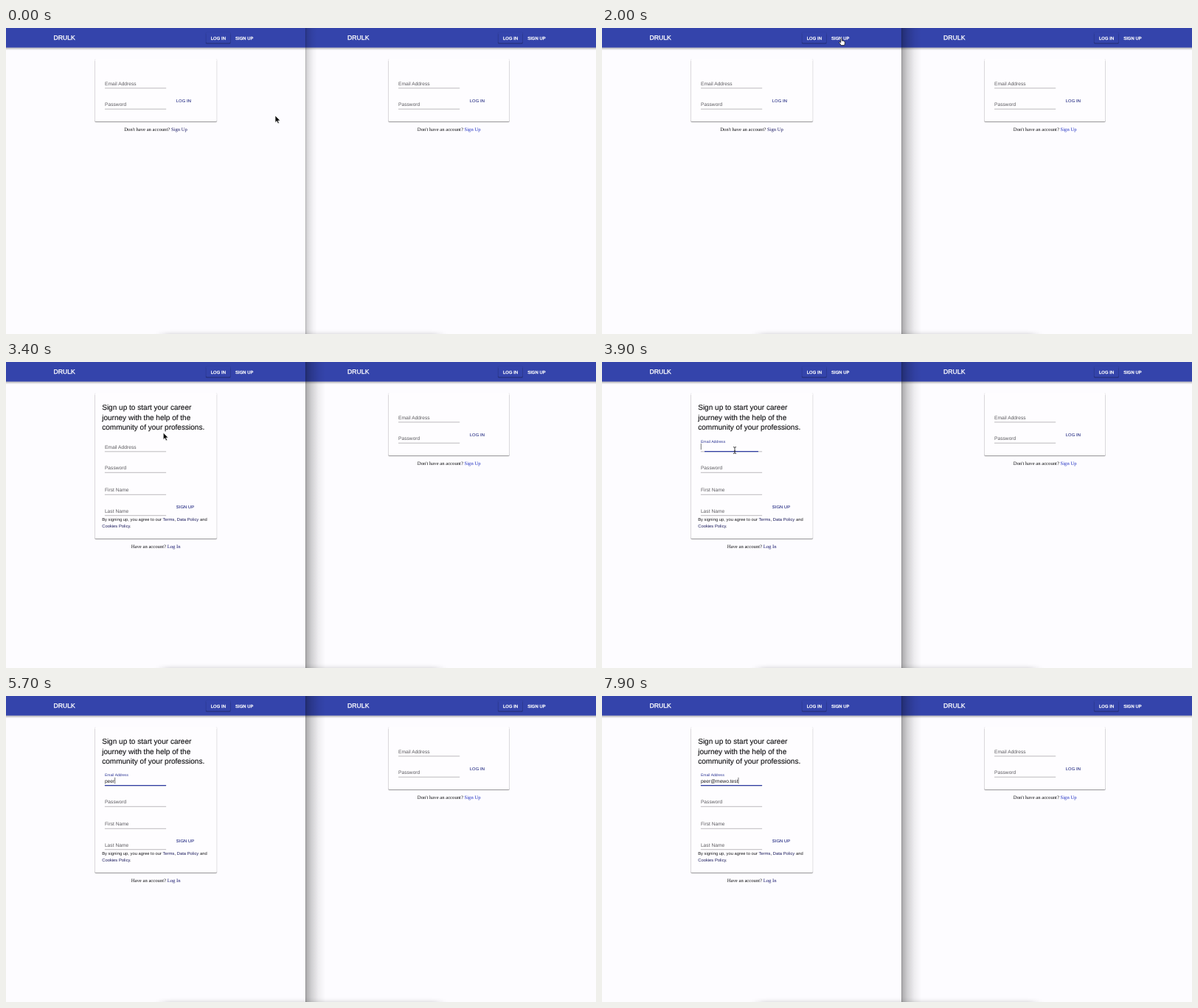
Recreate the animation shown at these times as an HTML page. Size 800 by 416 pixels, loop 8000 ms.

```html
<!DOCTYPE html>
<html lang="en">
<head>
<meta charset="utf-8">
<title>Sign up</title>
<style>
  html, body { margin: 0; width: 100%; height: 100%; overflow: hidden; background: #fdfcff; }
  svg { display: block; width: 100vw; height: 100vh; }
  text { font-family: "Liberation Sans", Arial, sans-serif; text-rendering: geometricPrecision; white-space: pre; }
  .brand { font-size: 8.6px; fill: #fff; stroke: #fff; stroke-width: .34px; letter-spacing: .06px; }
  .nav { font-size: 5.8px; fill: #fff; stroke: #fff; stroke-width: .32px; letter-spacing: .1px; }
  .button { font-size: 5.8px; fill: #2b3287; stroke: #2b3287; stroke-width: .12px; letter-spacing: .08px; }
  .label { font-size: 6.65px; fill: #5c5b5f; letter-spacing: .02px; }
  .typed { font-size: 6.7px; fill: #1c1c1e; }
  .title { font-size: 10.05px; fill: #111113; stroke: #111113; stroke-width: .12px; }
  .legal { font-size: 5.8px; fill: #1a1a1d; letter-spacing: .02px; }
  .legal tspan { fill: #1a1a5c; }
  .serif { font: 6.67px "Liberation Serif", Times, serif; fill: #0c0c0e; text-anchor: middle; }
  .line { stroke: #8d8c90; stroke-width: .6; }
</style>
</head>
<body>
<svg id="stage" viewBox="0 0 800 416" preserveAspectRatio="none">
  <defs>
    <linearGradient id="edge">
      <stop offset="0" stop-color="#000" stop-opacity=".34"/>
      <stop offset=".3" stop-color="#000" stop-opacity=".18"/>
      <stop offset=".65" stop-color="#000" stop-opacity=".06"/>
      <stop offset="1" stop-color="#000" stop-opacity="0"/>
    </linearGradient>
    <linearGradient id="under" x2="0" y2="1">
      <stop offset="0" stop-color="#000" stop-opacity=".38"/>
      <stop offset=".4" stop-color="#000" stop-opacity=".15"/>
      <stop offset="1" stop-color="#000" stop-opacity="0"/>
    </linearGradient>
    <filter id="soft" x="-10%" y="-300%" width="120%" height="700%"><feGaussianBlur stdDeviation="7 3.4"/></filter>
    <clipPath id="half"><rect width="406" height="416"/></clipPath>
  </defs>
  <g id="right"></g>
  <rect id="shade" x="406" height="416" fill="url(#edge)"/>
  <g id="left" clip-path="url(#half)"></g>
  <path d="M406.3 0V416" stroke="#000" stroke-opacity=".25" stroke-width=".6"/>
  <rect x="212" y="416" width="376" height="10" fill="#000" opacity=".2" filter="url(#soft)"/>
  <g id="status">
    <path d="M-1 407.5H132.5Q134.5 407.5 134.5 409.5V417H-1Z" fill="#fdfcff" stroke="#a5a4a8" stroke-width=".8"/>
    <text x="1.7" y="415.2" font-size="7.1" fill="#4a494d">workstand:5208/enroll</text>
  </g>
  <g id="pointer">
    <path id="arrow" d="M0 0V9.6L2.2 7.6L3.7 11L5.4 10.2L3.9 7H6.9Z" fill="#0b0b0c" stroke="#fff" stroke-width=".7" stroke-linejoin="round"/>
    <path id="hand" d="M-.8 .6Q0-.6 .8.6V3.4Q1.7 2.7 2.3 3.7Q3.2 3.2 3.7 4.2Q4.8 3.8 4.8 5V7Q4.6 8.4 3.9 9.6H-.3Q-1.3 7.8-2.9 6Q-3.2 4.8-2 4.9L-.8 5.9Z" fill="#fff" stroke="#111" stroke-width=".75" stroke-linejoin="round"/>
    <path id="beam" d="M-2-4.5Q0-4.5 0-3.3Q0-4.5 2-4.5M0-3.3V3.3M-1.1 1H1.1M-2 4.5Q0 4.5 0 3.3Q0 4.5 2 4.5" fill="none" stroke="#1c1c1e" stroke-width=".85"/>
  </g>
</svg>
<script>
const $ = id => document.getElementById(id);
const LOOP = 8000;
const FOCUS = 3790;
const OPEN = 2400;
const ADDRESS = 'peer@mewo.test';
const KEY_TIMES = [5150, 5280, 5410, 5550, 6000, 6250, 6370, 6490, 6620, 6880, 7040, 7170, 7310, 7450];

const text = (cls, x, y, body, id = '') => `<text class="${cls}" id="${id}" x="${x}" y="${y}">${body}</text>`;
const rect = (x, y, w, h, fill, opacity = 1) =>
  `<rect x="${x}" y="${y}" width="${w}" height="${h}" rx="1.6" fill="${fill}" opacity="${opacity}"/>`;
// a surface lifted by a faint rim and a firmer shadow below
const raised = (x, y, w, h, fill) =>
  rect(x - .6, y, w + 1.2, h + 1.6, '#000', .1) + rect(x - .1, y + 2, w + .2, h - 1.1, '#000', .3) + rect(x, y, w, h, fill);
const card = (x, w, bottom) => raised(x, 42, w, bottom - 42, '#fefdff');
const link = (body, color) => `<tspan fill="${color}">${body}</tspan>`;
const field = (x, y, name, id) =>
  text('label', x, y, name, id) + `<path class="line" d="M${x} ${y + 4.1}h83.2"/>`;

const header = (x, w, brandX, navX) => `
  <rect x="${x}" width="${w}" height="416" fill="#fdfcff"/>
  <rect x="${x}" y="26.5" width="${w}" height="4" fill="url(#under)"/>
  <rect x="${x}" width="${w}" height="26.6" fill="#3444ab"/>
  ${raised(navX - 6.6, 5.6, 33, 14.8, '#3444ab')}
  ${text('brand', brandX, 16.2, 'DRULK')}
  ${text('nav', navX, 15.7, 'LOG IN')}${text('nav', navX + 33.2, 15.7, 'SIGN UP')}`;

const loginPage = (x, w, middle, linkColor) => card(x, w, 127) +
  field(x + 13.4, 77.7, 'Email Address') + field(x + 13.4, 106.1, 'Password') +
  text('button', x + 110.2, 101, 'LOG IN') +
  text('serif', middle, 140.1, "Don't have an account? " + link('Sign Up', linkColor));

const titleLines = ['Sign up to start your career', 'journey with the help of the', 'community of your professions.'];
const signupPage = card(120.6, 165.2, 240) +
  titleLines.map((line, i) => text('title', 130.2, 65.2 + i * 13.4, line)).join('') +
  field(133.9, 117.7, 'Email Address', 'email') + field(133.9, 146.2, 'Password') +
  field(133.9, 176.2, 'First Name') + field(133.9, 204.6, 'Last Name') +
  '<path id="active" stroke="#2f3da3" stroke-width="1.2"/>' +
  text('typed', 133.9, 117.7, '', 'typed') +
  '<path id="caret" d="M0 110.8V119.2" stroke="#1c1c1e" stroke-width=".6"/>' +
  text('button', 230.8, 198.7, 'SIGN UP') +
  text('legal', 130.2, 216.3, 'By signing up, you agree to our <tspan>Terms</tspan>, <tspan>Data Policy</tspan> and') +
  text('legal', 130.2, 224.7, '<tspan>Cookies Policy</tspan>.') +
  text('serif', 203.2, 253.2, 'Have an account? ' + link('Log In', '#14146a'));

$('right').innerHTML = header(406, 394, 463, 674) + loginPage(518.6, 163.8, 600.7, '#1c2cc0');
$('left').innerHTML = header(0, 406, 64.4, 277.8) +
  `<g id="login">${loginPage(120.6, 165.2, 203.1, '#171760')}</g><g id="signup">${signupPage}</g>`;

// time, x, y
const PATH = [
  [0, 365, 119], [100, 364, 115], [500, 327, 14], [900, 327, 14], [1500, 323, 15], [1700, 324, 15],
  [2000, 324.5, 14], [2400, 327, 13], [2700, 328.5, 12.5], [2950, 328.5, 12.5], [3600, 180, 120]
];

const clamp = v => Math.min(1, Math.max(0, v));
const mix = (a, b, k) => a + (b - a) * k;
const show = (id, on) => $(id).setAttribute('visibility', on ? 'visible' : 'hidden');

// cubic-bezier(0, 0, .2, 1), solved by bisection
function easeOut(p) {
  let lo = 0, hi = 1;
  for (let i = 0; i < 20; i++) {
    const s = (lo + hi) / 2;
    if (.6 * s * s * (1 - s) + s ** 3 < p) lo = s; else hi = s;
  }
  return 3 * lo * lo * (1 - lo) + lo ** 3;
}

function pointerAt(t) {
  const i = PATH.findIndex(p => p[0] > t);
  if (i < 0) return PATH[PATH.length - 1].slice(1);
  const [t0, x0, y0] = PATH[i - 1], [t1, x1, y1] = PATH[i];
  const p = (t - t0) / (t1 - t0), k = p * p * (3 - 2 * p);
  return [mix(x0, x1, k), mix(y0, y1, k)];
}

function render(t) {
  const opened = t >= OPEN, focused = t >= FOCUS;
  $('login').style.display = opened ? 'none' : '';
  $('signup').style.display = opened ? '' : 'none';
  show('status', t >= 2300 && t < 3300);

  const front = t >= 1700;
  $('shade').setAttribute('width', front ? 27 : 16);
  $('shade').setAttribute('opacity', front ? 1 : .6);

  const [x, y] = pointerAt(t);
  const beam = t >= 3500, hand = !beam && front && y < 22;
  $('pointer').setAttribute('transform', `translate(${x} ${y})`);
  show('arrow', !beam && !hand);
  show('hand', hand);
  show('beam', beam && t < KEY_TIMES[0]);

  const k = easeOut(clamp((t - FOCUS) / 200));
  const label = $('email');
  label.setAttribute('y', mix(117.7, 108.5, k));
  label.style.fontSize = mix(6.65, 5, k) + 'px';
  label.style.fill = focused ? '#2c3594' : '';
  $('active').setAttribute('d', `M${175.5 - 41.6 * k} 121.6h${83.2 * k}`);

  const count = KEY_TIMES.filter(key => key <= t).length;
  const typed = $('typed');
  typed.textContent = ADDRESS.slice(0, count);
  const width = count ? typed.getComputedTextLength() : 0;
  const since = t - (count ? KEY_TIMES[count - 1] : FOCUS);
  $('caret').setAttribute('transform', `translate(${134.3 + width} 0)`);
  show('caret', focused && Math.floor(since / 500) % 2 === 0);
}

const start = performance.now();
function tick() {
  render((performance.now() - start) % LOOP);
  requestAnimationFrame(tick);
}
tick();
</script>
</body>
</html>
```
